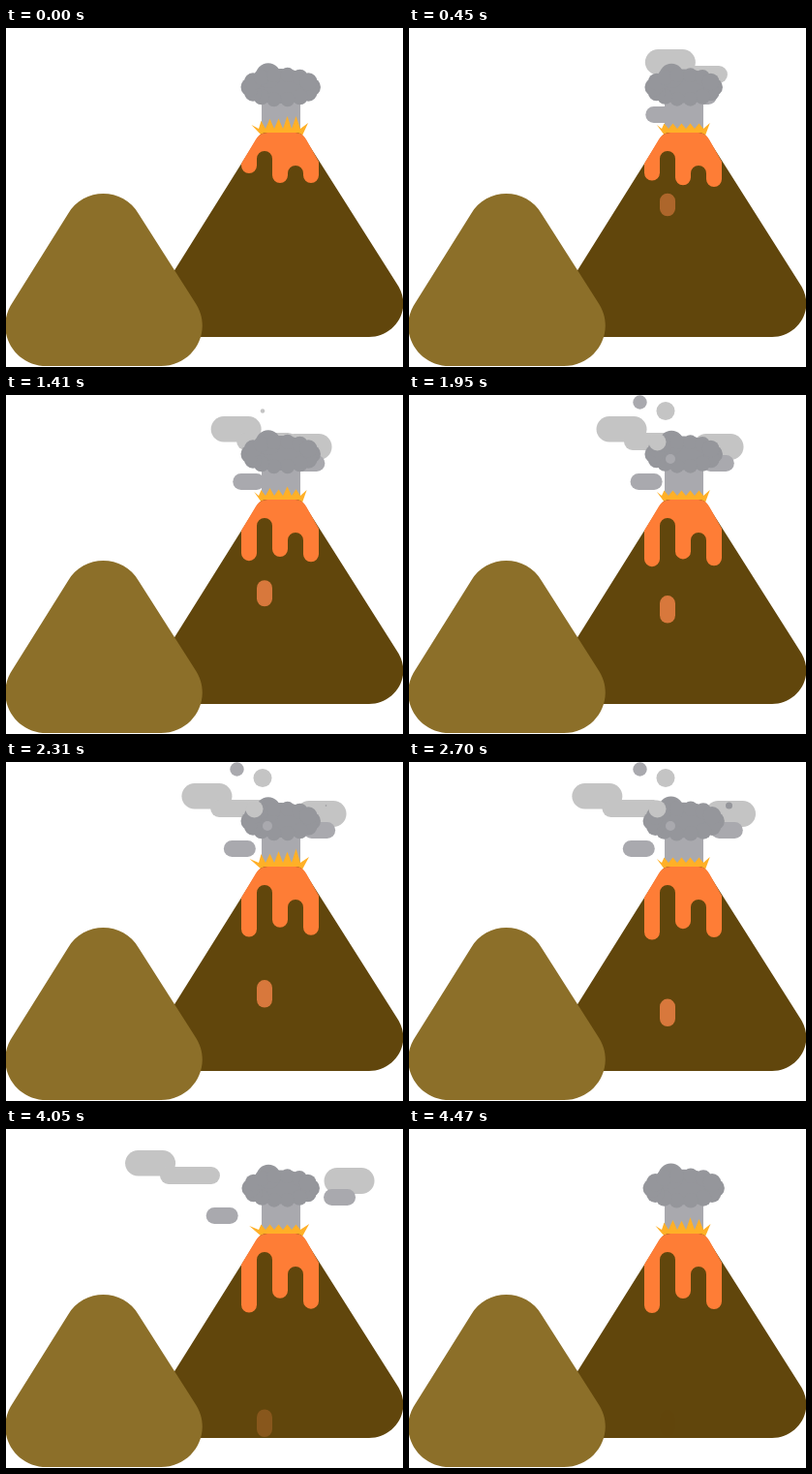
Write an HTML page with a canvas that moves like this. It is 410 by 350 pixels and loops after 4.5 s.

```html
<!DOCTYPE html>
<html lang="en">
<head>
<meta charset="utf-8">
<title>Volcano</title>
<style>
  html, body { margin: 0; width: 100%; height: 100%; overflow: hidden; background: #fff; }
  canvas { display: block; }
</style>
</head>
<body>
<canvas id="stage" width="410" height="350"></canvas>
<script>
const LOOP = 4500, TAU = 2 * Math.PI;
const LIGHT = '#c4c4c4', MID = '#a9a9ae', DARK = '#95969b';
const ctx = document.getElementById('stage').getContext('2d');

const clamp = v => Math.max(0, Math.min(1, v));
const ramp = (t, from, to) => clamp((t - from) / (to - from));
const easeOut = k => Math.sin(k * TAU / 4);

const backHill = new Path2D('M260 113Q263 108 270 108H299Q305 108 308 113L403 263C422 290 401 319 375 319H193C167 319 147 290 166 263Z');
const frontHill = new Path2D('M64 192C80 164 121 164 137 192L195 283C215 312 194 349 160 349H42C8 349 -13 312 7 283Z');

function fill(color, path) {
  ctx.fillStyle = color;
  path ? ctx.fill(path) : ctx.fill();
}

function circle(x, y, r, color) {
  ctx.beginPath();
  ctx.arc(x, y, r, 0, TAU);
  fill(color);
}

function pill(x, y, w, h, color) {
  ctx.beginPath();
  ctx.roundRect(x, y, w, h, Math.min(w, h) / 2);
  fill(color);
}

// Puffs drift steadily; those going right last a little longer.
function puff(t, x, y, w, h, travel) {
  const until = travel > 0 ? 4340 : 4130;
  if (t < 420 || t > until) return;
  pill(x + travel * t / LOOP, y, w, h, w < 40 ? MID : LIGHT);
}

function drawPuffs(t) {
  puff(t, 259, 22, 52, 26.5, -151);
  puff(t, 280.5, 39, 62, 18, -135);
  puff(t, 261, 40, 52, 27, 75);
  puff(t, 279.4, 62, 33, 17, 54);
  puff(t, 249, 81, 33, 17, -47);
}

function drawCloud(t) {
  const beat = Math.cos((t + 15) / 300 * TAU) * ramp(t, 0, 60);
  const scale = 0.993 + 0.024 * beat;
  ctx.save();
  ctx.translate(283.7, 60);
  ctx.scale(scale, scale);
  ctx.beginPath();
  ctx.ellipse(0, 0, 35, 18, 0, 0, TAU);
  fill(DARK);
  circle(-13, -11, 13, DARK);
  for (let i = 0; i < 14; i++) {
    const angle = i / 14 * TAU;
    circle(32 * Math.cos(angle), 1 + 13 * Math.sin(angle), 8.5 + Math.cos(2 * angle), DARK);
  }
  ctx.restore();
}

// A bubble grows, then fades; over the empty sky it is either solid or gone.
function bubble(t, x, y, r, color, born) {
  const size = r * easeOut(ramp(t, born, born + 400));
  const alpha = 1 - ramp(t, 2700, 3700);
  ctx.globalAlpha = alpha;
  ctx.globalCompositeOperation = 'source-atop';
  circle(x, y, size, color);
  ctx.globalAlpha = 1;
  ctx.globalCompositeOperation = 'destination-over';
  if (alpha > 0.5) circle(x, y, size, color);
  ctx.globalCompositeOperation = 'source-over';
}

function drawBubbles(t) {
  bubble(t, 265, 16.5, 9.5, LIGHT, 1350);
  bubble(t, 256.5, 48.5, 9, LIGHT, 1450);
  bubble(t, 270, 66, 5, MID, 1450);
  bubble(t, 238.5, 7.5, 7.2, MID, 1550);
  bubble(t, 330.5, 45, 3.5, DARK, 2250);
}

// Inner tips leap once per flicker, while the outer tips sway sideways.
function drawFlames(t) {
  const phase = t / 750;
  const sway = Math.sin(phase * TAU);
  ctx.beginPath();
  ctx.moveTo(264, 111);
  ctx.lineTo(253.5 - 4 * sway, 100);
  ctx.lineTo(261, 104);
  for (let i = 1; i <= 5; i++) {
    const x = 254.5 + 9 * i;
    const leap = Math.max(0, Math.cos((phase - 0.07 * (i % 2)) * TAU));
    ctx.lineTo(x, 98.5 - (2 + 1.4 * i) * leap ** 2);
    ctx.lineTo(x + 4.5, 104);
  }
  ctx.lineTo(312 + 2 * sway, 98);
  ctx.lineTo(306, 111);
  fill('#ffb027');
}

function drawLava(u) {
  const ease = easeOut(u);
  const left = 142 + 40 * (1 - (1 - u) ** 2);
  const middle = 152 + 15 * ease, right = 152 + 26 * ease;
  fill('#fe7d36', new Path2D(
    `M270 108H299Q306 108 310 115L323 138V${right}a8 8 0 0 1-16 0V150a8 8 0 0 0-16 0` +
    `V${middle}a8 8 0 0 1-16 0V135a8 8 0 0 0-16 0V${left}a8 8 0 0 1-16 0V140L258 115Q262 108 270 108Z`));
}

function drawDrop(t) {
  const slow = ramp(t, 0, 1800), fast = ramp(t, 1800, 3600);
  const height = 22 + 6.5 * slow;
  ctx.globalAlpha = ramp(t, 0, 700) * (1 - ramp(t, 3600, LOOP)) ** 1.6;
  pill(259, 183 + 45 * slow + 90 * fast - height, 16, height, '#d8783c');
  ctx.globalAlpha = 1;
}

function draw(t) {
  ctx.clearRect(0, 0, 410, 350);
  drawPuffs(t);
  ctx.fillStyle = MID;
  ctx.fillRect(264, 74, 40, 36);
  drawCloud(t);
  drawBubbles(t);
  drawFlames(t);
  fill('#61460c', backHill);
  drawLava(t / LOOP);
  drawDrop(t);
  fill('#8c6f29', frontHill);
}

const start = performance.now();
function tick() {
  draw((performance.now() - start) % LOOP);
  requestAnimationFrame(tick);
}
tick();
</script>
</body>
</html>
```
